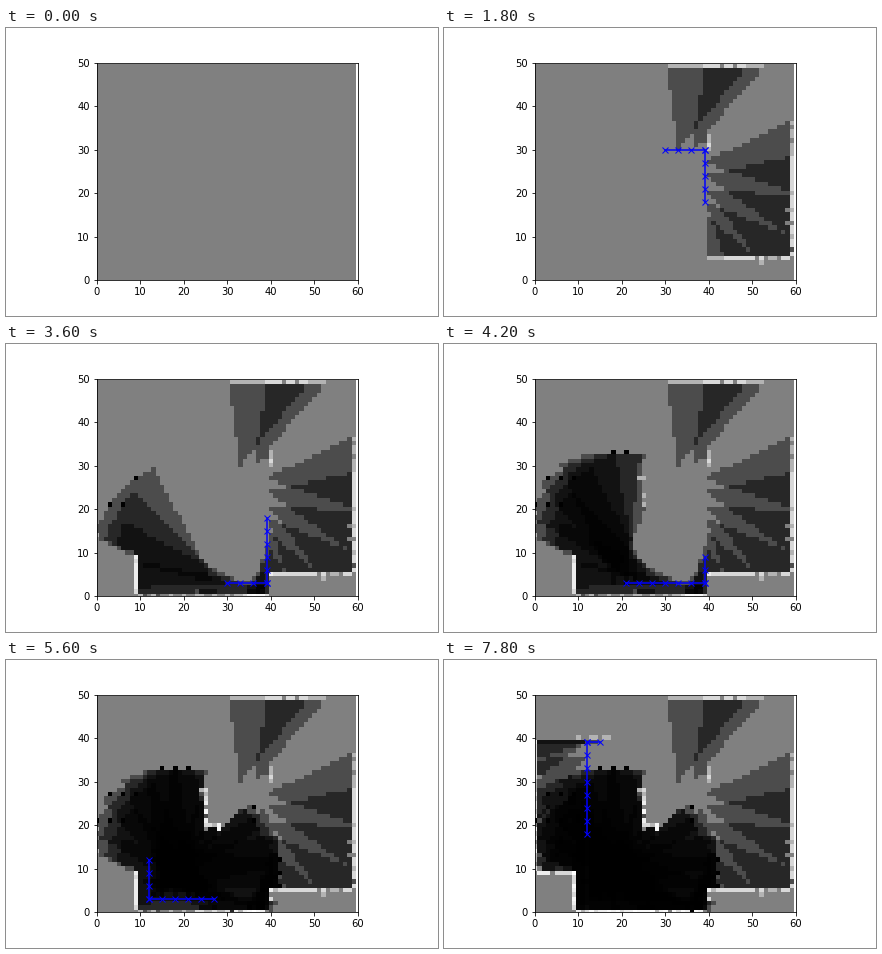
Recreate the animation shown at these times as a matplotlib script. Size 432 by 288 pixels, loop 8000 ms.

```python
import numpy as np
import matplotlib.pyplot as plt
from matplotlib.animation import FuncAnimation

ROWS, COLS = 50, 60
FRAMES, INTERVAL = 40, 200
R_MAX = 30
ALPHA, BETA = 1.0, np.radians(5)
SPIN = 0.3
BEAMS = np.arange(-0.4, 0.4, 0.05)
MOVES = [(3, 0), (0, 3), (-3, 0), (0, -3)]  # (row, col) steps
TRAIL = 10

world = np.zeros((ROWS, COLS), dtype=bool)
for r0, r1, c0, c1 in [(0, 10, 0, 10), (30, 35, 40, 45), (3, 6, 40, 60),
                       (20, 30, 25, 29), (40, 50, 5, 25)]:
    world[r0:r1, c0:c1] = True


def blocked(row, col):
    return (row <= 0 or row >= ROWS - 1 or col <= 0 or col >= COLS - 1
            or world[row, col])


def drive(steps):
    """Go straight; when blocked, stay for one step and turn right."""
    path, heading = [(30, 30)], 1
    for _ in range(steps):
        row, col = path[-1]
        dr, dc = MOVES[heading]
        if blocked(row + dr, col + dc):
            heading = (heading + 1) % 4
            path.append((row, col))
        else:
            path.append((row + dr, col + dc))
    return np.array(path)


def cast(row, col, angle):
    for r in range(1, R_MAX + 1):
        if blocked(int(round(row + r * np.cos(angle))),
                   int(round(col + r * np.sin(angle)))):
            return r
    return R_MAX


def scan(row, col, theta):
    """Occupancy probability of each cell given one sweep of the beams."""
    ranges = np.array([cast(row, col, theta + b) for b in BEAMS])
    i, j = np.mgrid[:ROWS, :COLS]
    r = np.hypot(i - row, j - col)
    phi = (np.arctan2(j - col, i - row) - theta + np.pi) % (2 * np.pi) - np.pi
    k = np.abs(phi[..., None] - BEAMS).argmin(axis=-1)
    hit = ranges[k]
    unseen = ((r > np.minimum(R_MAX, hit + ALPHA / 2))
              | (np.abs(phi - BEAMS[k]) > BETA / 2))
    wall = (hit < R_MAX) & (np.abs(r - hit) < ALPHA / 2)
    # Cells exactly at full range count as certainly free.
    return np.select([unseen, wall, r < hit], [0.5, 0.7, 0.3], 0.0)


def build_beliefs(path):
    log_odds = np.zeros((ROWS, COLS))
    beliefs = [np.full((ROWS, COLS), 0.5)]
    for t in range(1, len(path)):
        p = scan(*path[t], (SPIN * t) % (2 * np.pi))
        with np.errstate(divide="ignore"):
            log_odds = log_odds + np.log(p / (1 - p))
        odds = np.exp(log_odds)
        beliefs.append(odds / (1 + odds))
    return beliefs


path = drive(FRAMES - 1)
beliefs = build_beliefs(path)

fig, ax = plt.subplots(figsize=(6, 4), dpi=72)
fig.subplots_adjust(left=0.125, right=0.9, bottom=0.125, top=0.88)
ax.set_xlim(0, COLS)
ax.set_ylim(0, ROWS)
image = ax.imshow(beliefs[0], cmap="gray", origin="lower", vmin=0, vmax=1,
                  interpolation="nearest")
ax.set_xlim(0, COLS)
ax.set_ylim(0, ROWS)
trail, = ax.plot([], [], "bx-")


def update(frame):
    image.set_data(beliefs[frame])
    recent = path[max(0, frame - TRAIL):frame]
    trail.set_data(recent[:, 1], recent[:, 0])
    return image, trail


anim = FuncAnimation(fig, update, frames=FRAMES, interval=INTERVAL,
                     init_func=lambda: update(0), repeat=True, repeat_delay=0)
plt.show()
```
